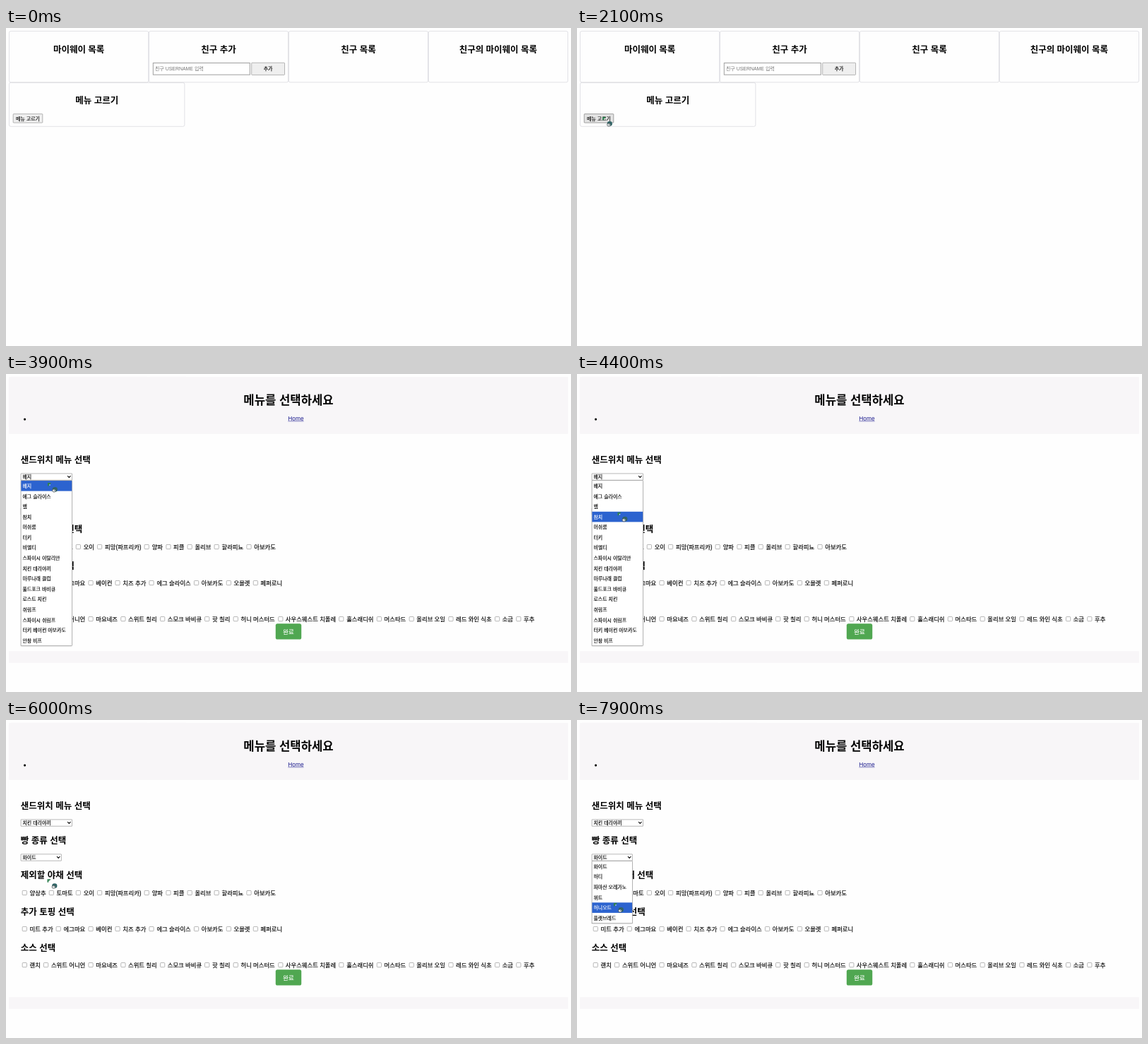
An HTML page that plays this animation: 800x450 px, repeating every 8 s.

```html
<!DOCTYPE html>
<html lang="ko">
<head>
<meta charset="utf-8">
<title>메뉴 고르기</title>
<style>
  html, body { margin: 0; width: 100%; height: 100%; overflow: hidden; background: #fefefe; }
  /* the page is laid out 1536 wide and shown at 800 */
  #page { position: absolute; left: 0; top: 0; width: 1536px; height: 864px;
    transform: scale(.5208333); transform-origin: 0 0; color: #000;
    font: 16px "Liberation Sans", "Noto Sans CJK KR", sans-serif; -webkit-text-stroke: .3px; }
  .scene { position: absolute; inset: 0; }
  .box, .text { position: absolute; box-sizing: border-box; white-space: nowrap; }
  .text { line-height: 40px; }
  .mid { transform: translateX(-50%); }
  .h1 { font-size: 32px; font-weight: bold; -webkit-text-stroke: 0; }
  .h2 { font-size: 24px; font-weight: bold; -webkit-text-stroke: 0; }
  .small { font-size: 13.333px; }
  .card { border: 1px solid #c8c8ce; border-radius: 5px; }
  .bar { background: #f8f6f8; }
  .dot { background: #000; border-radius: 50%; }
  .field { border: 2px solid #a2a2a2; background: #fff; }
  .btn { border: 1px solid #767676; border-radius: 2px; background: #efefef;
    font-size: 13.333px; text-align: center; }
  .btn.hover { background: #e3e3e3; border-color: #555; }
  .hint { color: #757575; -webkit-text-stroke: 0; }
  .link { color: #1f1f8f; text-decoration: underline; -webkit-text-stroke: 0; }
  .done { background: #50a751; border-radius: 5px; color: #fff; text-align: center; line-height: 45.6px; }
  .select { border: 1px solid #767676; border-radius: 1px; background: #fff;
    font-size: 13.333px; line-height: 17.5px; padding-left: 4px; }
  .select::after { content: ""; position: absolute; right: 4px; top: 2.5px; width: 5px; height: 5px;
    border: solid #000; border-width: 0 2px 2px 0; transform: rotate(45deg); }
  .popup { border: 1px solid #767676; background: #fff; font-size: 13.333px;
    box-shadow: 0 2px 4px rgba(0, 0, 0, .22); }
  .popup div { height: 28px; line-height: 29px; padding-left: 4px; }
  .popup .on { background: #2c63cf; color: #fff; }
  .row i { display: inline-block; box-sizing: border-box; width: 13px; height: 13px; margin: 0 3px 0 4px;
    border: 1px solid #767676; border-radius: 2.5px; background: #fff; }
  #cursor { position: absolute; left: 0; top: 0; width: 16px; height: 16px; overflow: visible; }
</style>
</head>
<body>
<div id="page"><div class="scene" id="home"></div><div class="scene" id="menu"></div></div>
<svg id="cursor" viewBox="0 0 16 16">
  <path id="arrow" d="M0 0H5L3.4 1.9L2 2.2L1.7 4.6H0Z" fill="#2f8050"/>
  <path id="beam" d="M.8 1.5H3.6M2.2 1.5V6.5M.8 6.5H3.6" fill="none" stroke="#274f50" stroke-width=".9"/>
  <circle cx="3" cy="3" r=".7" fill="#fff"/>
  <ellipse cx="10.3" cy="9.4" rx="3.6" ry="3.3" fill="#316567"/>
  <ellipse cx="9" cy="11" rx="2.4" ry="2.1" fill="#e9eeee" stroke="#3b4648" stroke-width=".7"/>
  <circle cx="9.6" cy="10.6" r=".7" fill="#59686a"/>
</svg>
<script>
const $ = id => document.getElementById(id);
const home = $('home'), menu = $('menu');

function add(parent, cls, x, y, html) {
  const el = document.createElement('div');
  el.className = cls;
  el.style.left = x + 'px';
  el.style.top = y + 'px';
  el.innerHTML = html || '';
  return parent.appendChild(el);
}
function box(parent, cls, x, y, w, h, html) {
  const el = add(parent, 'box ' + cls, x, y, html);
  el.style.width = w + 'px';
  el.style.height = h + 'px';
  return el;
}
// y is the middle of the line
const text = (parent, cls, x, y, html) => add(parent, 'text ' + cls, x, y - 20, html);

// first page
['마이웨이 목록', '친구 추가', '친구 목록', '친구의 마이웨이 목록'].forEach((title, i) => {
  box(home, 'card', 8 + 380 * i, 8, 380, 140);
  text(home, 'h2 mid', 198 + 380 * i, 58.6, title);
});
box(home, 'field', 399, 93.5, 265, 34);
text(home, 'small hint', 405, 110.5, '친구 USERNAME 입력');
box(home, 'btn', 667, 93.5, 91, 34, '추가').style.lineHeight = '33px';
box(home, 'card', 8, 148, 478, 120);
text(home, 'h2 mid', 247, 197.6, '메뉴 고르기');
const pick = box(home, 'btn', 19, 232.5, 81, 25.5, '메뉴 고르기');
pick.style.lineHeight = '25px';

// second page
box(menu, 'bar', 8, 8, 1520, 155);
box(menu, 'bar', 8, 753, 1520, 32);
text(menu, 'h1 mid', 768, 71.2, '메뉴를 선택하세요');
box(menu, 'dot', 48, 120, 6, 6);
text(menu, 'link mid', 788, 122.2, 'Home');

// two sections hold a select, the rest a row of checkboxes
const SELECT_GAP = 94, ROW_GAP = 98.24;
['샌드위치 메뉴 선택', '빵 종류 선택', '제외할 야채 선택', '추가 토핑 선택', '소스 선택'].forEach((title, i) =>
  text(menu, 'h2', 40, 234.4 + SELECT_GAP * Math.min(i, 2) + ROW_GAP * Math.max(i - 2, 0), title));

const rows = [
  '양상추,토마토,오이,피망(파프리카),양파,피클,올리브,할라피뇨,아보카도',
  '미트 추가,에그마요,베이컨,치즈 추가,에그 슬라이스,아보카도,오믈렛,페퍼로니',
  '랜치,스위트 어니언,마요네즈,스위트 칠리,스모크 바비큐,핫 칠리,허니 머스터드,사우스웨스트 치폴레,' +
  '홀스래디쉬,머스타드,올리브 오일,레드 와인 식초,소금,후추'
];
rows.forEach((row, i) =>
  text(menu, 'row', 40, 470.9 + ROW_GAP * i, row.split(',').map(s => '<i></i> ' + s).join(' ')));
box(menu, 'done', 733.3, 677.7, 69.4, 43.2, '완료');

const fillings = ('베지,에그 슬라이스,햄,참치,머쉬룸,터키,비엘티,스파이시 이탈리안,치킨 데리야끼,마루나래 클럽,' +
  '풀드포크 바비큐,로스트 치킨,쉬림프,스파이시 쉬림프,터키 베이컨 아보카도,안창 비프').split(',');
const breads = '화이트,하티,파마산 오레가노,위트,허니오트,플랫브레드'.split(',');

function dropdown(items, y, w) {
  const field = box(menu, 'select', 40, y, w, 19, items[0]);
  const list = box(menu, 'popup', 40, y + 19, w, items.length * 28 + 2,
    items.map(s => `<div>${s}</div>`).join(''));
  return { field, list, top: y + 20, count: items.length };
}
const bread = dropdown(breads, 364, 111);
const filling = dropdown(fillings, 270, 140);

// pointer tip: time, x, y
const path = [
  [600, 330, 236], [900, 306, 244], [1300, 199, 175], [1800, 36, 126], [2400, 36, 126],
  [2800, 35, 127], [3100, 35, 128], [3500, 62, 145], [3900, 59, 154], [4200, 58, 168],
  [5000, 56, 279], [5500, 56, 279], [6300, 60, 193], [6600, 60, 194], [7000, 56, 227], [7900, 52, 259]
];
function tipAt(t) {
  const i = path.findIndex(p => p[0] > t);
  if (i < 0) return path[path.length - 1].slice(1);
  if (i === 0) return path[0].slice(1);
  const [t0, x0, y0] = path[i - 1], [t1, x1, y1] = path[i];
  const k = (t - t0) / (t1 - t0);
  return [x0 + (x1 - x0) * k, y0 + (y1 - y0) * k];
}

function hover(menuBox, open, y) {
  menuBox.list.style.display = open ? '' : 'none';
  const row = Math.floor((y * 1.92 - menuBox.top) / 28);
  const hit = Math.max(0, Math.min(menuBox.count - 1, row));
  [...menuBox.list.children].forEach((el, i) => el.classList.toggle('on', i === hit));
}

const LOOP = 8000, STEP = 100;
const show = (el, on) => { el.style.display = on ? '' : 'none'; };

function draw(ms) {
  const t = Math.floor(ms % LOOP / STEP) * STEP;
  const [x, y] = tipAt(t);
  const onMenu = t >= 2400;
  show(home, !onMenu);
  show(menu, onMenu);
  pick.classList.toggle('hover', x > 10 && x < 52 && y > 121 && y < 135);
  hover(filling, t >= 3600 && t < 5300, y);
  hover(bread, t >= 6600, y);
  filling.field.textContent = fillings[t < 5300 ? 0 : 8];

  const beam = onMenu && t < 3300;
  show($('cursor'), t >= path[0][0]);
  show($('beam'), beam);
  show($('arrow'), !beam);
  $('cursor').style.transform = `translate(${x}px, ${y}px)`;
}

const start = performance.now();
function tick() {
  draw(performance.now() - start);
  requestAnimationFrame(tick);
}
tick();
</script>
</body>
</html>
```
